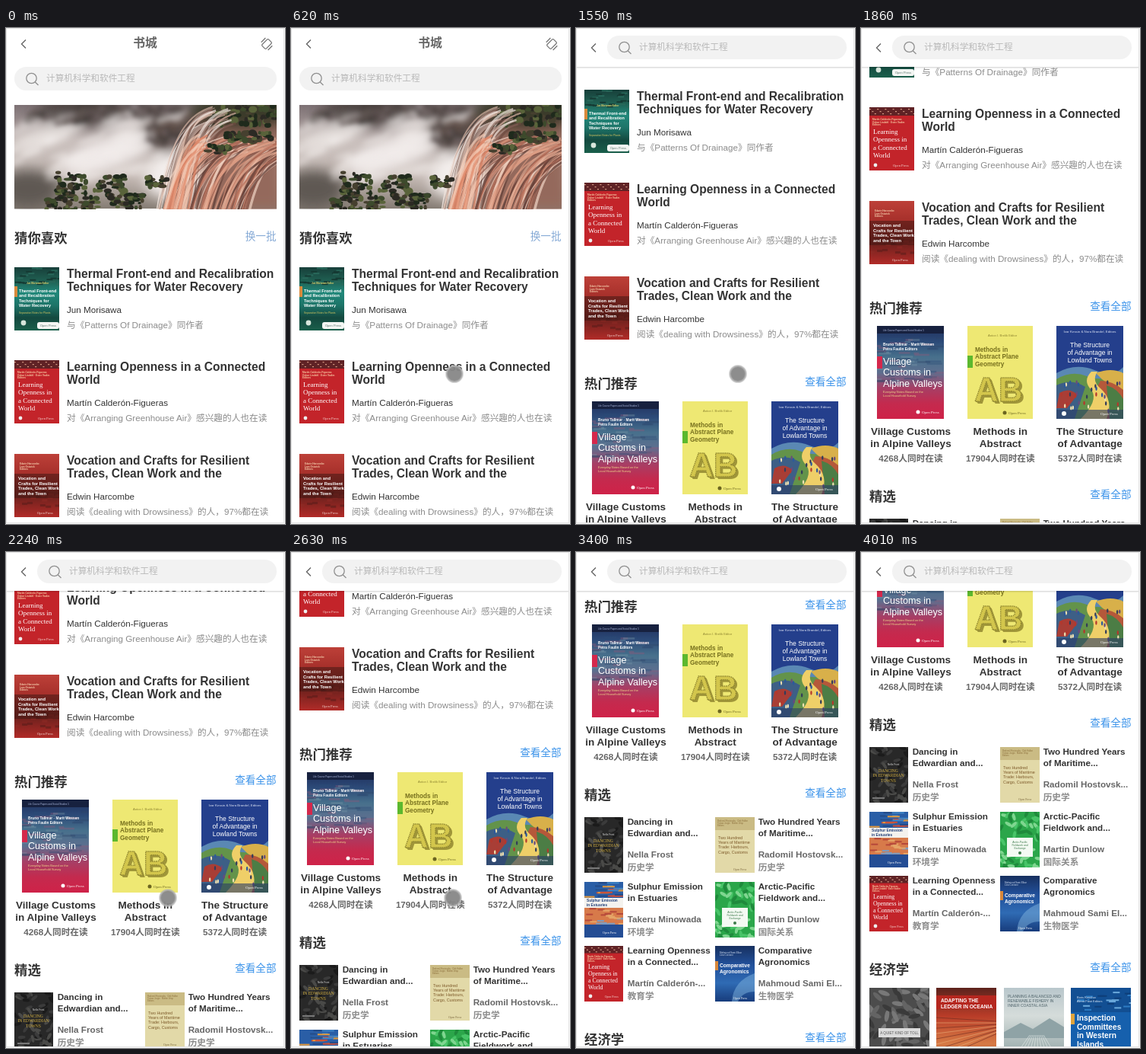
Write an HTML page that moves like this. It is 367 px wide and 651 px high and loops after 4.56 s.

```html
<!DOCTYPE html>
<html lang="zh-CN">
<head>
<meta charset="utf-8">
<title>书城</title>
<style>
@property --p { syntax: "<number>"; inherits: true; initial-value: 0; }
html, body { margin: 0; width: 100%; height: 100%; overflow: hidden; background: #fafafa; }
body { position: relative; font-family: "Liberation Sans", "Noto Sans CJK SC", "Noto Sans CJK", sans-serif; color: #333; }
#view { position: absolute; left: 0; top: 0; width: 366px; height: 650px; overflow: hidden; background: #fff; }
#frame { position: absolute; inset: 0; border: 1px solid #e2e2e2; }
#page, #head, #touch, .link { animation: 4560ms step-end infinite; }
#page { position: absolute; left: 0; top: 0; width: 366px; height: 1420px; animation-name: scroll; }
#page svg, #head svg { position: absolute; overflow: hidden; }

.t { position: absolute; line-height: 20px; margin-top: -10px; white-space: nowrap; font-size: 11.68px; }
.c { width: 160px; margin-left: -80px; text-align: center; }
.h { font-size: 17.4px; font-weight: bold; }
.link { width: 160px; margin-left: -160px; text-align: right; font-size: 13.6px; font-weight: 500; animation-name: link; }
.big { font-size: 15.57px; font-weight: bold; }
.mid { font-size: 13.55px; font-weight: bold; }
.b { font-weight: bold; }
.g6 { color: #666; }
.g8 { color: #8c8c8c; }

#head { position: absolute; left: 0; top: 0; width: 366px; height: 51px; background: #fff; animation-name: head; }
#name, #shake { opacity: calc(1 - var(--p) * 1.1); transform: translateY(calc(var(--p) * 15px)); }
#name { position: absolute; left: 0; top: 10px; width: 366px; line-height: 20px; text-align: center; font-size: 15.8px; font-weight: bold; color: #666; }
#back { left: 17px; top: 14px; transform: translateY(calc(var(--p) * 5px)); }
#shake { left: 334px; top: 12px; }
#search { position: absolute; left: calc(11px + var(--p) * 30px); right: 10.5px; top: calc(51px - var(--p) * 40.7px); height: 31px; border-radius: 16px; background: #f2f2f2; }
#search svg { left: 14px; top: 6px; }
#search span { position: absolute; left: 42px; top: 5px; line-height: 20px; font-size: 11.68px; color: #b9b9b9; white-space: nowrap; }
#touch { position: absolute; left: -11.5px; top: -11.5px; width: 19px; height: 19px; border: 2px solid #b2b2b2; border-radius: 50%; background: #878787; animation-name: touch; }

@keyframes scroll {
  0% { transform: none; }
  20.17% { transform: translateY(-52px); }
  22.14% { transform: translateY(-91px); }
  23.68% { transform: translateY(-130px); }
  25.43% { transform: translateY(-139px); }
  30.48% { transform: translateY(-145px); }
  32.23% { transform: translateY(-195px); }
  33.98% { transform: translateY(-233px); }
  35.74% { transform: translateY(-238px); }
  37.28% { transform: translateY(-270px); }
  39.03% { transform: translateY(-318px); }
  40.78% { transform: translateY(-332px); }
  47.36% { transform: translateY(-344px); }
  48.9% { transform: translateY(-398px); }
  50.65% { transform: translateY(-429px); }
  57.67% { transform: translateY(-434px); }
  59.42% { transform: translateY(-486px); }
  60.96% { transform: translateY(-522px); }
  62.71% { transform: translateY(-526px); }
  67.76% { transform: translateY(-548px); }
  69.51% { transform: translateY(-604px); }
  71.27% { transform: translateY(-624px); }
  74.56% { transform: translateY(-628px); }
  76.31% { transform: translateY(-676px); }
  77.85% { transform: translateY(-716px); }
  79.6%, 100% { transform: translateY(-720px); }
}
@keyframes head {
  0% { --p: 0; box-shadow: none; }
  20.17% { --p: .02; box-shadow: 0 1px 2px #0003; }
  22.14% { --p: .25; box-shadow: 0 1px 2px #0003; }
  23.68% { --p: .7; box-shadow: 0 1px 2px #0003; }
  25.43%, 100% { --p: 1; box-shadow: 0 1px 2px #0003; }
}
@keyframes link {
  0% { color: #86aad6; }
  20.17%, 100% { color: #3b93ea; }
}
@keyframes touch {
  0% { opacity: 0; transform: translate(293px, 623px); }
  1.53% { opacity: .95; transform: translate(293px, 623px); }
  3.28% { opacity: .95; transform: translate(281px, 588px); }
  5.04% { opacity: .95; transform: translate(258px, 532px); }
  6.57% { opacity: .95; transform: translate(236px, 486px); }
  8.33% { opacity: .95; transform: translate(220px, 459px); }
  9.86% { opacity: .95; transform: translate(215.5px, 453.5px); }
  13.59% { opacity: .95; transform: translate(214.5px, 453.5px); }
  20.17% { opacity: .95; transform: translate(213.5px, 453.5px); }
  30.48% { opacity: .95; transform: translate(212.5px, 453.5px); }
  40.78% { opacity: 0; transform: translate(212.5px, 453.5px); }
  47.36% { opacity: .95; transform: translate(212.5px, 453.5px); }
  71.27% { opacity: 0; transform: translate(212.5px, 453.5px); }
  76.31% { opacity: .95; transform: translate(212.5px, 453.5px); }
  79.6% { opacity: .95; transform: translate(220px, 470px); }
  81.14% { opacity: .95; transform: translate(232px, 500px); }
  82.89% { opacity: .95; transform: translate(250px, 545px); }
  84.64% { opacity: .95; transform: translate(275px, 595.5px); }
  86.4% { opacity: .95; transform: translate(288.5px, 629.5px); }
  87.93%, 100% { opacity: 0; transform: translate(288.5px, 629.5px); }
}
</style>
</head>
<body>
<div id="view">
  <div id="page"></div>
  <div id="head">
    <svg id="back" width="14" height="14" fill="none" stroke="#666" stroke-width="1.4"><path d="M9 1.5 3.5 7 9 12.5"/></svg>
    <div id="name">书城</div>
    <svg id="shake" width="18" height="18" fill="none" stroke="#777" stroke-width="1.3"><g transform="rotate(-45 9 9)"><rect x="3" y="5.2" width="12" height="7.6" rx="1.5"/><path d="M5.5 2.2h8M4.5 15.8h8"/></g></svg>
    <div id="search">
      <svg width="20" height="20" fill="none" stroke="#8f8f8f" stroke-width="1.3"><circle cx="8.5" cy="9" r="6.7"/><path d="m13.3 14 4.2 4"/></svg>
      <span>计算机科学和软件工程</span>
    </div>
  </div>
  <div id="touch"></div>
  <div id="frame"></div>
</div>
<script>
let seed = 7;
const rnd = (a, b) => a + (seed = seed * 16807 % 2147483647) / 2147483647 * (b - a);
const times = (n, f) => Array.from({ length: n }, (_, i) => f(i)).join('');

const label = (x, y, cls, s) => `<div class="t ${cls}" style="left:${x}px;top:${y}px">${s}</div>`;
const art = (x, y, w, h, body) => `<svg style="left:${x}px;top:${y}px" width="${w}" height="${h}">${body}</svg>`;
const rect = (x, y, w, h, fill, more = '') => `<rect x="${x}" y="${y}" width="${w}" height="${h}" fill="${fill}" ${more}/>`;
const oval = (x, y, rx, ry, fill, more = '') => `<ellipse cx="${x}" cy="${y}" rx="${rx}" ry="${ry}" fill="${fill}" ${more}/>`;
const path = (d, fill, more = '') => `<path d="${d}" fill="${fill}" ${more}/>`;
const words = (x, y, size, fill, s, more = '') => s.split('|').map((line, i) =>
  `<text x="${x}" y="${y + i * size * 1.15}" font-size="${size}" fill="${fill}" ${more}>${line}</text>`).join('');
const fade = (id, ...stops) => `<linearGradient id="${id}" x2="0" y2="1">${stops.map((c, i) =>
  `<stop offset="${i / (stops.length - 1)}" stop-color="${c}"/>`).join('')}</linearGradient>`;
const serif = 'font-family="Liberation Serif, serif"';
const mid = 'text-anchor="middle"';
const bold = 'font-weight="bold"';

function banner() {
  const blur = (id, r) => `<filter id="${id}"><feGaussianBlur stdDeviation="${r}"/></filter>`;
  const group = (id, ...parts) => `<g filter="url(#${id})">${parts.join('')}</g>`;
  const fall = (x, y, dx, n, spread, tones) => times(n, i => {
    const a = x + rnd(-spread, spread), b = y + rnd(-10, 16), e = a - dx + rnd(-12, 12);
    return path(`M${a} ${b}C${a - dx * .6} ${b + 10} ${e + 12} ${b + 45} ${e} 142`, 'none',
      `stroke="${tones[i % tones.length]}" stroke-width="${rnd(1, 3.5)}" opacity=".7"`);
  });
  const clump = (x, y, w, h, tones = ['#1f2a1c', '#3d4a2c', '#2c2a24', '#59633a', '#46402f']) => times(Math.round(w * 1.6), i =>
    oval(x + rnd(-w, w), y + rnd(-h, h), rnd(2, 6), rnd(1.5, 4.5), tones[i % tones.length]));
  const bark = ['#4c4241', '#5d5250', '#3e3835', '#6d6160'];
  const mist = (x, y, rx, ry, o) => oval(x, y, rx, ry, '#f3eeec', `opacity="${o}" transform="rotate(-18 ${x} ${y})"`);
  const warm = ['#8d5546', '#dd9a80', '#f0d3c4', '#b8705a', '#e5ae96', '#5f3d36'];
  return `<defs>${fade('sky', '#7d7174', '#b5a9a6', '#cbc0bb', '#857c73')}${blur('far', 9)}${blur('near', 3.5)}${blur('edge', .7)}</defs>`
    + rect(0, 0, 345, 136, 'url(#sky)')
    + group('far', rect(235, 20, 120, 120, '#94695c'), oval(90, 8, 60, 20, '#4c4241'), oval(205, 36, 42, 26, '#5b4b45'), oval(18, 110, 42, 26, '#5f5952'),
      oval(300, 8, 70, 26, '#3b3a2c'), mist(40, 42, 50, 16, .8), mist(120, 64, 62, 22, .95), mist(205, 92, 34, 30, 1), mist(150, 24, 22, 12, .6))
    + group('near', clump(150, 10, 70, 9, bark), clump(60, 16, 44, 8, bark), clump(205, 38, 30, 12, bark),
      times(40, () => mist(rnd(0, 225), rnd(14, 100), rnd(6, 24), rnd(2, 6), .4)))
    + group('edge', clump(305, 12, 46, 15), fall(272, 12, 60, 34, 20, ['#a98d83', '#efe3dc', '#6d4a40', '#d5b2a3']),
      fall(338, 46, 85, 75, 55, warm), fall(250, 48, 42, 26, 9, ['#e79a7c', '#f3c9b4', '#d98163']), clump(308, 42, 30, 6), clump(268, 58, 14, 5),
      clump(75, 102, 20, 14), clump(76, 126, 34, 14), clump(128, 104, 18, 10), clump(146, 126, 24, 9), clump(188, 101, 13, 6));
}

const red = (w, h, k, s) => rect(0, 0, w, h, '#c3242a') + rect(0, 0, w, 11 * k, '#5f2225')
  + times(18, i => rect(i * 3.4 * k, 2 + i % 3 * 3 * k, 2, 1.2, '#d59a83'))
  + words(4, 17 * k, 3.2 * k, '#f5c7a0', 'Martín Calderón-Figueras|Oskar Lindahl · Ester Vadim|Editors', bold)
  + words(5, 35 * k, 9 * k, '#fff', s, serif)
  + oval(8, h - 7, 2.4, 2.4, '#eee') + words(w - 28 * k, h - 5, 4.6 * k, '#f3d9d4', 'Open Press', serif);

const dots = (w, h, n, colors, f) => times(n, i => f(rnd(0, w), rnd(0, h), colors[i % colors.length]));
const leaf = (x, y, c) => oval(x, y, 5, 2.1, c, `transform="rotate(${rnd(0, 180)} ${x} ${y})"`);

const covers = {
  thermal: () => `<defs>${fade('pine', '#173f3a', '#1f5d50', '#21887a', '#1d7468', '#14493f', '#1a5f4b')}</defs>` + rect(0, 0, 59, 83, 'url(#pine)')
    + dots(59, 22, 26, ['#28685a', '#153a33'], (x, y, c) => rect(x, y, 8, 2, c)) + rect(0, 25, 4, 14, '#d98a3c')
    + words(16, 22, 3, '#e6d36a', 'Jun Morisawa Editor', bold)
    + words(6, 33, 5.6, '#fff', 'Thermal Front-end|and Recalibration|Techniques for|Water Recovery', bold)
    + words(6, 61, 3.4, '#d9c860', 'Separation Notes for Plants')
    + oval(12, 73, 3.4, 3.4, '#d8e6dc') + rect(30, 72, 29, 9, '#f3f6f3', 'rx="3"') + words(34, 78, 4, '#57736c', 'Open Press'),
  patience: () => red(59, 83, 1, 'Learning|Openness in|a Connected|World'),
  crafts: () => `<defs>${fade('brick', '#bd4038', '#a52f2a', '#6d211d', '#b12b28')}</defs>` + rect(0, 0, 59, 83, 'url(#brick)')
    + dots(59, 26, 30, ['#8f2a26', '#5d1d1a'], (x, y, c) => rect(x, y + 44, 7, 3, c, 'opacity=".6"'))
    + words(7, 14, 3.2, '#f2c9a8', 'Edwin Harcombe|Lars Ostwick|Editors', bold) + rect(0, 26, 59, 32, '#3d1713', 'opacity=".5"')
    + words(5, 34, 5.8, '#fff', 'Vocation and|Crafts for Resilient|Trades, Clean Work|and the Town', bold)
    + words(30, 79, 4.6, '#f3d9d4', 'Open Press', serif),
  village: () => `<defs>${fade('dusk', '#1f2f5c', '#2c4a78', '#47708c', '#5d6f8f', '#a63f66', '#c42a4e', '#cf2248')}</defs>` + rect(0, 0, 88, 122, 'url(#dusk)')
    + dots(88, 62, 60, ['#2b4b76', '#7595a6', '#8f5878', '#2f4468'], (x, y, c) => rect(x - 6, y + 14, rnd(6, 22), 2.5, c, 'opacity=".4"'))
    + rect(0, 0, 88, 10, '#17213f') + words(8, 7, 3, '#aebbe0', 'Life Course Papers and Social Studies 5')
    + words(8, 26, 4.8, '#fff', 'Bruno Tallmar · Marit Wessen|Petra Faulin Editors', bold) + rect(0, 40, 7, 16, '#d5284c')
    + words(8, 51, 12.6, '#fff', 'Village|Customs in|Alpine Valleys') + words(8, 88, 4, '#f0d98a', 'Everyday Notes Based on the|Local Household Survey')
    + oval(54, 113, 2.5, 2.5, '#fff') + words(59, 115, 5, '#fff', 'Open Press', serif),
  methods: () => rect(0, 0, 86, 122, '#eee873') + words(27, 14, 4.2, '#8d8430', 'Anton I. Brelik Editor')
    + rect(0, 39, 7, 16, '#5cb82e') + words(10, 34, 8.2, '#77701e', 'Methods in|Abstract Plane|Geometry', bold)
    + times(5, i => words(44 - i * .8, 102 - i * .8, 44, i < 4 ? '#a0963a' : '#d3c64c', 'AB', `${bold} ${mid}`))
    + words(40.8, 98.8, 44, 'none', 'AB', `${bold} ${mid} stroke="#8f8630" stroke-width="1.4" stroke-dasharray="1.5 1"`)
    + oval(49, 114, 2.5, 2.5, '#6b6520') + words(54, 116, 5, '#6b6520', 'Open Press', serif),
  structure: () => rect(0, 0, 88, 122, '#243f8c') + words(44, 9, 4.4, '#dfe5f5', 'Ivar Kessin &amp; Nora Brandel, Editors', mid)
    + words(44, 28, 8.6, '#fff', 'The Structure|of Advantage in|Lowland Towns', mid)
    + path('M0 62Q25 48 50 58T88 54V122H0Z', '#5a88b4') + path('M0 70Q20 58 40 66T88 62V122H0Z', '#63934a')
    + path('M52 62Q72 54 88 62V86Q66 78 52 62Z', '#d8b04a') + path('M58 72Q74 72 88 84V122H50Q46 92 58 72Z', '#b5583a')
    + path('M66 78Q80 82 88 96V122H70Z', '#4c7d45') + path('M0 78Q20 68 38 80L24 122H0Z', '#3d5f86') + path('M4 88Q16 80 28 90L14 108H0Z', '#a83e36')
    + path('M46 60Q34 72 46 84Q56 98 32 122H66Q76 98 58 82Q46 72 54 60Z', '#efcf68')
    + dots(84, 40, 34, ['#b5372d', '#2c5a9c', '#eee0b0', '#333c5a', '#6a4a7c'], (x, y, c) => oval(x + 2, y + 74, 1.2, 2.8, c))
    + rect(0, 110, 88, 12, '#2b3c66', 'opacity=".6"') + oval(10, 115, 3, 3, '#fff') + words(58, 117, 5, '#fff', 'Open Press', serif),
  dancing: () => rect(0, 0, 51, 73, '#282828') + dots(51, 73, 55, ['#3b3b3b', '#4a4a48', '#1b1b1b'], leaf)
    + words(24, 24, 3.2, '#ddd', 'Nella Frost') + words(25, 33, 5.6, '#d9b545', 'DANCING|IN EDWARDIAN|TOWNS', `${serif} ${mid}`) + rect(4, 66, 16, 2, '#777'),
  maritime: () => rect(0, 0, 52, 73, '#e2d9a8') + rect(0, 0, 52, 17, '#cabb84') + words(3, 6, 2.8, '#8a6d3a', 'Radomil Hostovsky · Dirk Hallen|Tomas Jurgin · Martin Vesp|Editors')
    + words(4, 29, 5.4, '#7d5a2a', 'Two Hundred|Years of Maritime|Trade: Harbours,|Cargo, Customs') + words(24, 70, 3.8, '#7d6a40', 'Open Press', serif),
  sulphur: () => rect(0, 0, 51, 73, '#2a5ea6') + dots(51, 20, 20, ['#3f86c7', '#c94e39', '#e49a3c', '#254b87'], (x, y, c) => rect(x - 5, y, 16, 2, c))
    + rect(0, 21, 51, 13, '#f4f2ee') + words(3, 26, 4.8, '#24427a', 'Sulphur Emission|in Estuaries', bold) + rect(0, 34, 51, 22, '#d77a4a')
    + dots(45, 22, 24, ['#e5a668', '#b6483a', '#7d9cc0'], (x, y, c) => rect(x, y + 34, 9, 2, c)) + rect(0, 56, 51, 17, '#244d94') + words(24, 68, 4, '#fff', 'Open Press', serif),
  arctic: () => rect(0, 0, 52, 73, '#2ba64a') + dots(52, 73, 60, ['#48c468', '#1f8a3c', '#7fd690'], leaf)
    + rect(9, 34, 34, 25, '#f4faf3') + words(26, 41, 3.4, '#3c7a4a', 'Arctic-Pacific|Fieldwork and|Exchange', mid) + oval(26, 54, 2, 2, '#3c7a4a'),
  agronomics: () => `<defs>${fade('deep', '#17305f', '#22509a', '#2f6bb4', '#173c7c')}</defs>` + rect(0, 0, 52, 73, 'url(#deep)')
    + path('M22 73Q24 46 52 36V60Q36 60 30 73Z', '#7fb2dd', 'opacity=".5"') + words(6, 10, 3, '#cfdcf0', 'Mahmoud Sami Elbar|Lina Corvane') + rect(0, 20, 4, 12, '#d9883b')
    + words(6, 28, 6.6, '#fff', 'Comparative|Agronomics', bold) + words(24, 70, 4, '#fff', 'Open Press', serif),
  toll: () => rect(0, 0, 79, 110, '#4c4c4c') + dots(79, 110, 80, ['#646464', '#3a3a3a', '#787878'], (x, y, c) => oval(x, y, 8, 3, c, `transform="rotate(${rnd(0, 180)} ${x} ${y})"`))
    + rect(12, 53, 55, 12, '#dcdcdc') + words(39.5, 61, 4.6, '#555', 'A QUIET KIND OF TOLL', mid),
  ledger: () => `<defs>${fade('rust', '#5c231d', '#b83c28', '#d67a45', '#8f2f22')}</defs>` + rect(0, 0, 80, 110, 'url(#rust)')
    + times(9, i => path(`M0 ${95 - i * 7}L80 ${60 - i * 2}`, 'none', `stroke="${i % 2 ? '#eab07a' : '#6d2a20'}" opacity=".6"`))
    + rect(0, 10, 80, 18, '#b5271f') + words(6, 19, 6.6, '#fff', 'ADAPTING THE|LEDGER IN OCEANIA', bold),
  fishery: () => `<defs>${fade('haze', '#b9c7cc', '#d5dcda', '#a9b8b8', '#71878a')}</defs>` + rect(0, 0, 80, 110, 'url(#haze)')
    + words(5, 13, 5, '#4c6067', 'PLANNING A BALANCED AND|RENEWABLE FISHERY IN|INNER COASTAL ASIA') + path('M0 58L22 46 38 54 60 40 80 52V66H0Z', '#8fa3a6')
    + times(10, i => path(`M${i * 9} 110L${34 + i * 2} 62`, 'none', 'stroke="#dfe6e4" opacity=".7"')),
  islands: () => rect(0, 0, 79, 110, '#1660ad') + rect(0, 0, 79, 32, '#124f93') + dots(79, 28, 26, ['#2d7cc4', '#0e3f7a', '#6aa9dc'], (x, y, c) => rect(x, y, 9, 2, c))
    + words(8, 14, 4, '#e3eefa', 'Boris Kendrov|Alena Fasti Editors') + rect(0, 34, 5, 14, '#e0a33b')
    + words(8, 43, 10.2, '#fff', 'Inspection|Committees|in Western|Islands', bold),
};

const section = (y, name, link = '查看全部') => label(11, y, 'h', name) + label(355.5, y - 2, 'link', link);

const guess = [
  ['thermal', 'Thermal Front-end and Recalibration', 'Techniques for Water Recovery', 'Jun Morisawa', '与《Patterns Of Drainage》同作者'],
  ['patience', 'Learning Openness in a Connected', 'World', 'Martín Calderón-Figueras', '对《Arranging Greenhouse Air》感兴趣的人也在读'],
  ['crafts', 'Vocation and Crafts for Resilient', 'Trades, Clean Work and the', 'Edwin Harcombe', '阅读《dealing with Drowsiness》的人，97%都在读'],
];
const hot = [
  ['village', 21, 88, 'Village Customs', 'in Alpine Valleys', 4268],
  ['methods', 140, 86, 'Methods in', 'Abstract', 17904],
  ['structure', 257, 88, 'The Structure', 'of Advantage', 5372],
];
const picks = [
  ['dancing', 'Dancing in', 'Edwardian and...', 'Nella Frost', '历史学'],
  ['maritime', 'Two Hundred Years', 'of Maritime...', 'Radomil Hostovsk...', '历史学'],
  ['sulphur', 'Sulphur Emission', 'in Estuaries', 'Takeru Minowada', '环境学'],
  ['arctic', 'Arctic-Pacific', 'Fieldwork and...', 'Martin Dunlow', '国际关系'],
  ['learning', 'Learning Openness', 'in a Connected...', 'Martín Calderón-...', '教育学'],
  ['agronomics', 'Comparative', 'Agronomics', 'Mahmoud Sami El...', '生物医学'],
];
covers.learning = () => red(51, 73, .87, 'Learning|Openness in|a Connected|World');

document.getElementById('page').innerHTML = [
  art(11, 101, 344.5, 136.5, banner()),
  section(276, '猜你喜欢', '换一批'),
  ...guess.map(([id, a, b, who, why], i) => {
    const y = Math.floor(314 + i * 122.5);
    return art(11, y, 59, 83, covers[id]()) + label(80, y + 8.5, 'big', a) + label(80, y + 25.8, 'big', b)
      + label(80, y + 56, '', who) + label(80, y + 75.5, 'g8', why);
  }),
  section(700, '热门推荐'),
  ...hot.map(([id, x, w, a, b, n], i) => {
    const c = 65.5 + i * 117.8;
    return art(x, 723, w, 122, covers[id]()) + label(c, 862, 'mid c', a) + label(c, 878, 'mid c', b)
      + label(c, 896.5, 'b c g6', n + '人同时在读');
  }),
  section(947, '精选'),
  ...picks.map(([id, a, b, who, kind], i) => {
    const x = i % 2 ? 183 : 11, y = Math.round(975.7 + (i >> 1) * 84.8);
    return art(x, y, i % 2 ? 52 : 51, 73, covers[id]()) + label(x + 56.7, y + 6.2, 'b', a) + label(x + 56.7, y + 20.6, 'b', b)
      + label(x + 56.7, y + 49.3, 'b g6', who) + label(x + 56.7, y + 65.5, 'b g8', kind);
  }),
  section(1268, '经济学'),
  ...['toll', 'ledger', 'fishery', 'islands'].map((id, i) => art(11 + i * 88.3, 1292, 79, 110, covers[id]())),
].join('');
</script>
</body>
</html>
```
